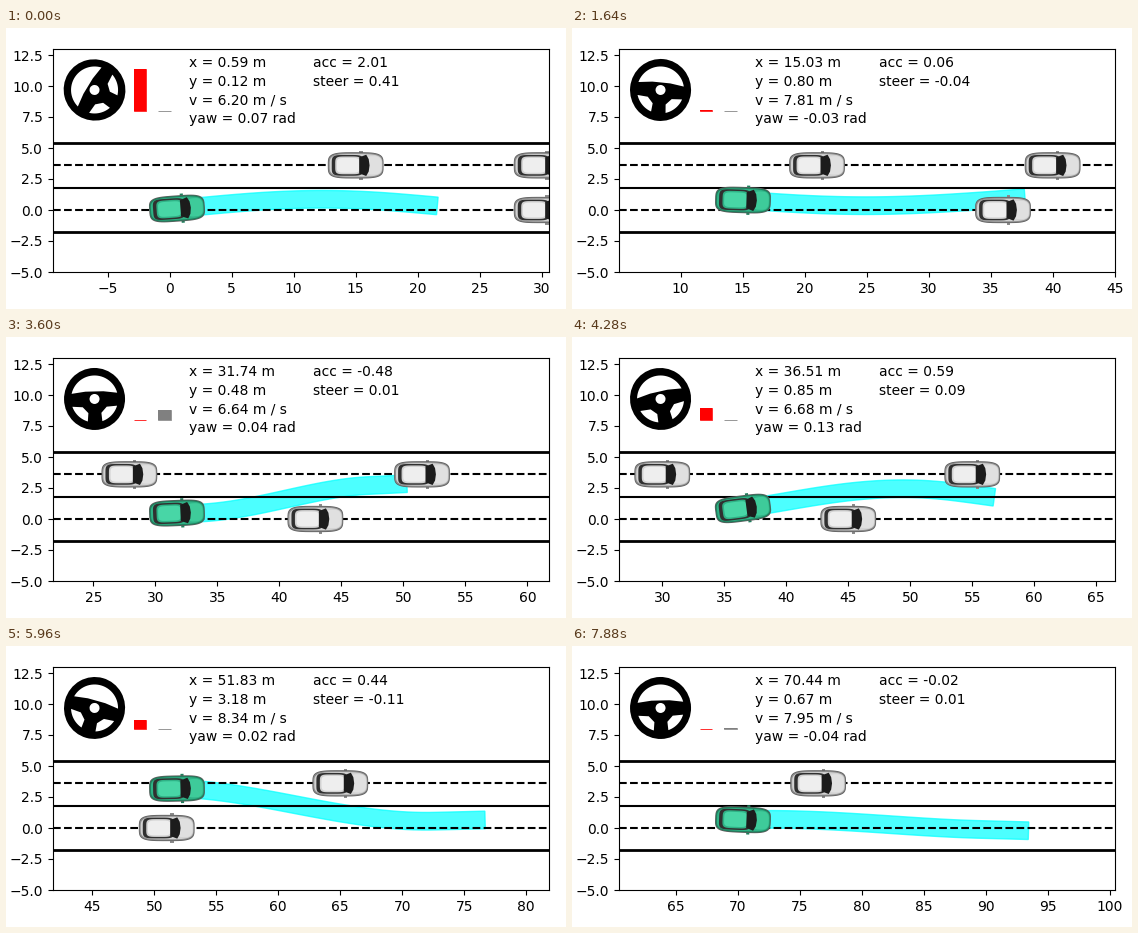
A matplotlib script for the animation above (8000 ms loop, 560x281 px).

```python
import numpy as np
import matplotlib.pyplot as plt
from matplotlib.animation import FuncAnimation
from matplotlib.lines import Line2D
from matplotlib.patches import Circle, Ellipse, Polygon, Rectangle
from matplotlib.ticker import MultipleLocator
from matplotlib.transforms import Affine2D

plt.rcParams["font.family"] = "DejaVu Sans"

W, H, DPI = 560, 281, 100
FRAMES, INTERVAL = 200, 40
DT, STEPS = 0.1, 93      # simulated seconds per step
PX = 1 / 12.4            # metres per pixel

# Key moments of the drive; everything between is interpolated
T = np.array([0, 2, 3, 4.3, 5.7, 7, 9.3])
X = np.array([0.59, 15.03, 22.71, 31.74, 41.57, 51.83, 70.44])
Y = np.array([0.12, 0.80, 0.32, 0.48, 1.77, 3.18, 0.67])
V = np.array([6.20, 7.81, 7.36, 6.64, 7.46, 8.34, 7.95])
YAW = np.array([0.07, -0.03, -0.06, 0.04, 0.24, 0.02, -0.04])
ACC = np.array([2.01, 0.06, -0.80, -0.48, 1.62, 0.44, -0.02])
STEER = np.array([0.41, -0.04, 0.05, 0.01, 0.10, -0.11, 0.01])
PLAN_END = [0.33, 1.0, -0.8, 2.85, 0.65, 0.65, -0.22]
PLAN_BOW = [0.6, -0.57, 0.5, -0.3, 2.1, -0.2, 0.2]
HALF_WIDTH = 0.71

# Other traffic: start x, lane y, speed
TRAFFIC = [(15, 3.6, 3), (30, 3.6, 5), (30, 0, 3)]

# Frame at which each simulation step appears
STARTS = np.floor(0.3 + np.interp(np.arange(STEPS + 1), [0, 1, 20, 43, 57, 93],
                                  [0, 1, 41, 90, 121, 197]))


def locate(t):
    """Key interval holding t, its length and the fraction passed."""
    i = int(np.clip(np.searchsorted(T, t, "right") - 1, 0, len(T) - 2))
    h = T[i + 1] - T[i]
    return i, h, (t - T[i]) / h


def hermite(t, p, m):
    """Value and slope of a cubic curve through p with slopes m."""
    i, h, s = locate(t)
    d = p[i + 1] - p[i]
    a, b = m[i] * h - d, d - m[i + 1] * h
    mix = (1 - s) * a + s * b
    slope = d + (1 - 2 * s) * mix + s * (1 - s) * (b - a)
    return p[i] + s * d + s * (1 - s) * mix, slope / h


def ego_state(t):
    x, _ = hermite(t, X, V)
    y, dy = hermite(t, Y, V * np.tan(YAW))
    v, acc = hermite(t, V, ACC)
    i, _, s = locate(t)
    steer = STEER[i + 1] + (STEER[i] - STEER[i + 1]) * (1 - s) ** 3
    return x, y, v, np.arctan2(dy, v), acc, steer


def plan_band(t, x, y, v, acc):
    """Outline of the planned path: an eased lane shift plus a bow."""
    s = np.linspace(0, 1, 40)
    u = np.minimum(1.2 * s, 1)
    px = x + s * (2.9 * v + 1.5 * acc)
    py = (y + (np.interp(t, T, PLAN_END) - y) * u * u * (3 - 2 * u)
          + np.interp(t, T, PLAN_BOW) * np.sin(np.pi * s))
    ang = np.arctan(np.gradient(py, px))
    side = HALF_WIDTH * np.column_stack([-np.sin(ang), np.cos(ang)])
    mid = np.column_stack([px, py])
    return np.vstack([mid + side, (mid - side)[::-1]])


fig = plt.figure(figsize=(W / DPI, H / DPI), dpi=DPI, facecolor="white")
ax = fig.add_axes([47 / W, 37 / H, 496 / W, 223.2 / H])
ax.set_autoscale_on(False)
ax.set_ylim(-5, 13)
ax.xaxis.set_major_locator(MultipleLocator(5))
ax.yaxis.set_major_locator(MultipleLocator(2.5))
fig.add_artist(Line2D([0, 1], [0.5 / H] * 2, color="#c4c4c4", lw=0.72))

for i in range(5):       # lane borders and centre lines
    ax.axhline(1.8 * (i - 1), color="black", lw=1.5 if 0 < i < 4 else 2,
               ls="--" if i in (1, 3) else "-")

band = ax.add_patch(Polygon(np.zeros((3, 2)), fc="cyan", ec="cyan",
                            lw=1, alpha=0.7, zorder=1))


def blob(cx, a, b, n=4):
    """Rounded box centred on (cx, 0)."""
    u = np.linspace(0, 2 * np.pi, 60)
    c, s = np.cos(u), np.sin(u)
    return np.column_stack([cx + a * np.sign(c) * abs(c) ** (2 / n),
                            b * np.sign(s) * abs(s) ** (2 / n)])


def mirrored(half):
    """Close a half outline by reflecting it across the long axis."""
    half = np.array(half)
    return np.vstack([half, half[::-1] * [1, -1]])


class Car:
    def __init__(self, edge, body, light, roof):
        self.tr = Affine2D()
        self.part(mirrored([(0.3, 1.18), (0.55, 1.18)]), edge)
        self.part(blob(0, 2.25, 1.06), "#5c5c5c")
        self.part(blob(0, 2.20, 1.00), edge)
        self.part(blob(0.02, 2.12, 0.91), body)
        self.part(blob(1.4, 0.68, 0.74, 3), light)
        self.part(blob(-0.65, 1.28, 0.84, 5), "#303030")
        self.part(blob(-0.6, 1.05, 0.72, 5), body)
        self.part(blob(-0.6, 0.92, 0.60, 5), roof)
        self.part(mirrored([(0.28, 0.64), (0.85, 0.86), (1.05, 0.5),
                            (1.12, 0), (0.42, 0)]), "#1c1c1c")

    def part(self, pts, color):
        ax.add_patch(Polygon(pts, fc=color, ec="none", zorder=2.3,
                             transform=self.tr + ax.transData))

    def place(self, x, y, yaw=0):
        self.tr.clear().rotate(yaw).translate(x, y)


traffic = [Car("#8c8c8c", "#d2d2d2", "#e0e0e0", "#eeeeee") for _ in TRAFFIC]
ego = Car("#1f7f5c", "#2fb286", "#3ecb9a", "#48d6a6")

# Steering wheel, drawn in pixels around its hub
wheel_tr = Affine2D()


def wheel_part(patch):
    patch.set(transform=wheel_tr + ax.transData, ec="none", zorder=2.1)
    ax.add_patch(patch)


def arc(a0, a1, r=23.5):
    u = np.radians(np.linspace(a0, a1, 30))
    return np.column_stack([r * np.cos(u), r * np.sin(u)])


wheel_part(Ellipse((0, 0), 61, 62, fc="black"))
top = np.vstack([arc(14, 166), [(-9, 7.5), (9, 7.5)]])
left = np.vstack([arc(198, 252), [(-6.5, -14), (-12, -8)]])
for hole in (top, left, left * [-1, 1]):
    wheel_part(Polygon(hole, fc="white"))
wheel_part(Circle((0, 0), 5, fc="white"))


def bar(color):
    style = dict(color=color, lw=0.72, alpha=0.8, fill=False)
    return [ax.add_patch(Rectangle((0, 8), 1, 0, zorder=2.1, **kw))
            for kw in (dict(fc=color), style)]


gas, brake = bar("red"), bar("gray")
LABELS = ["x = {0:.2f} m", "y = {1:.2f} m", "v = {2:.2f} m / s",
          "yaw = {3:.2f} rad", "acc = {4:.2f}", "steer = {5:.2f}"]
texts = [ax.text(0, 11.5 - 1.5 * (i % 4), "", fontsize=10)
         for i in range(len(LABELS))]


def draw(frame):
    t = DT * (np.searchsorted(STARTS, frame, "right") - 1)
    state = ego_state(t)
    x, y, v, yaw, acc, steer = state
    ax.set_xlim(x - 10, x + 30)

    for car, (x0, lane_y, speed) in zip(traffic, TRAFFIC):
        car.place(x0 + speed * t, lane_y)
    ego.place(x, y, yaw)
    band.set_xy(plan_band(t, x, y, v, acc))
    wheel_tr.clear().rotate(2.5 * steer).scale(PX).translate(x - 6.65, 9.68)

    for rects, dx, level in [(gas, -3.5, acc), (brake, -1.5, -acc)]:
        for r in rects:
            r.set_x(x + dx)
            r.set_height(max(level, 0) * 5 / 3)
    for i, (text, form) in enumerate(zip(texts, LABELS)):
        text.set_x(x + 1 + 10 * (i // 4))
        text.set_text(form.format(*state))
    return []


anim = FuncAnimation(fig, draw, frames=FRAMES, interval=INTERVAL,
                     init_func=lambda: draw(0), repeat=True, repeat_delay=0)
plt.show()
```
